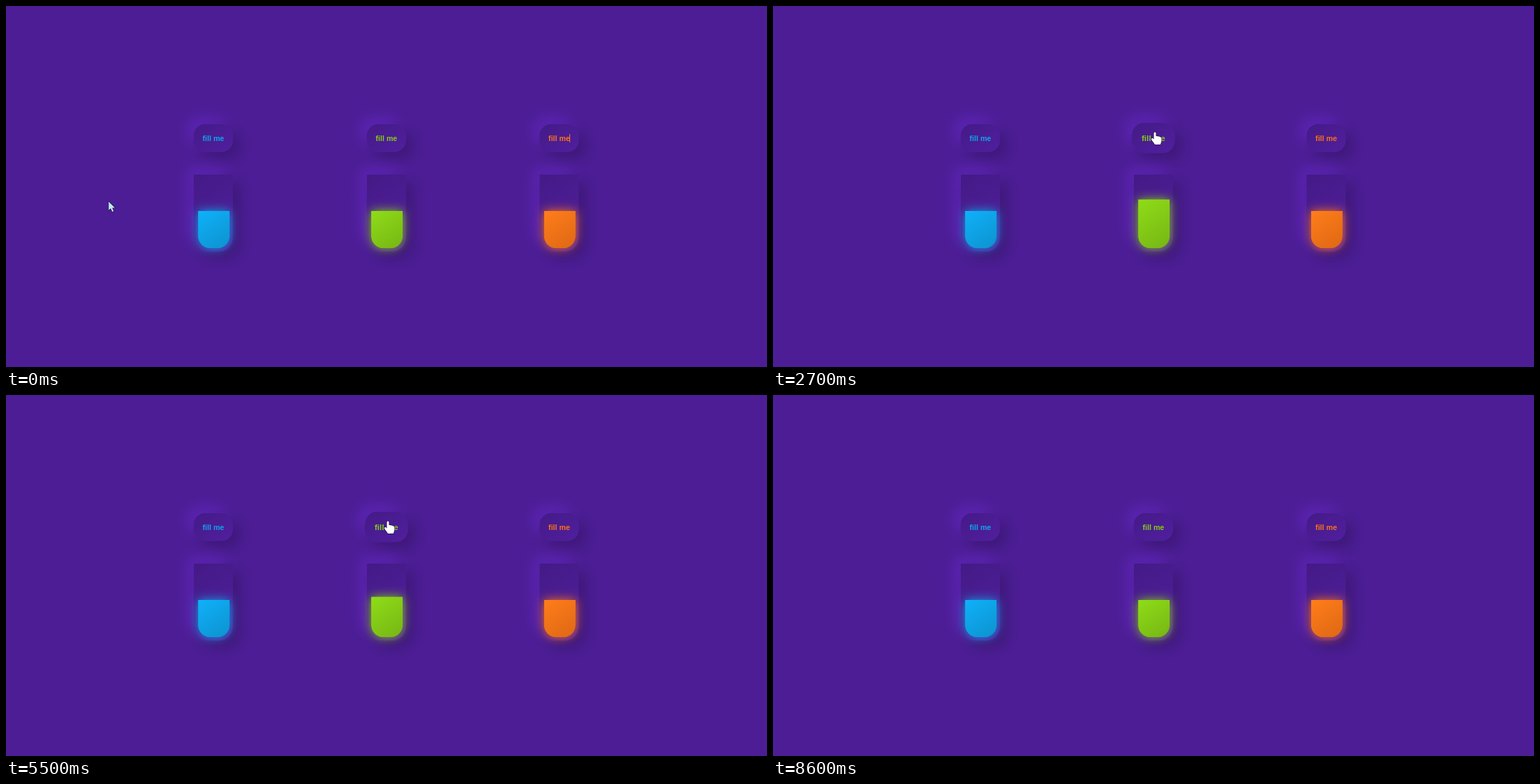
An HTML page with a canvas for the animation above (8.7 s loop, 1086 by 516 pixels).

```html
<!DOCTYPE html>
<html lang="en">
<head>
<meta charset="utf-8">
<title>Fill buttons</title>
<style>
  html, body { margin: 0; width: 100%; height: 100%; overflow: hidden; background: #4c1d95; }
  canvas { display: block; }
</style>
</head>
<body>
<canvas id="stage" width="1086" height="516"></canvas>
<script>
const ctx = document.getElementById('stage').getContext('2d');
const LOOP = 8700, STEP = 100;
const DARK = '#3d1777', LIGHT = '#5b23b3';
const BTN = { y: 169, w: 55.4, h: 39.4, r: 16 };
const TUBE = { y: 241, h: 110, r: [0, 0, 20, 20] };
const FILL = { bottom: 346, low: 53, high: 80, w: 44.5 };
const RISE = 1000, HOLD = 150, FALL = 500;

const columns = [
  { x: 268.2, text: '#0ea5e9', top: '#0fb1f9', end: '#0d92ce', clicks: [880, 6950] },
  { x: 515.2, text: '#84cc16', top: '#8fdc18', end: '#76b614', clicks: [2130, 5250] },
  { x: 761.8, text: '#f97316', top: '#ff7d1a', end: '#de6814', clicks: [3850] }
];

// Pointer stops: time, x, y
const path = [
  [0, 146, 279], [200, 146, 279], [750, 299, 180], [1100, 299, 180],
  [1700, 461, 85], [1950, 474, 88], [2110, 545, 180], [2800, 545, 180],
  [3200, 655, 152], [3650, 796, 180], [4050, 796, 180], [4700, 661.5, 329],
  [5150, 545, 180], [5550, 545, 180], [6300, 349.5, 233], [6400, 345, 231],
  [6800, 299, 180], [7030, 299, 180], [7300, 522, 371], [7400, 613, 451],
  [7550, 700, 500], [7700, 727, 520], [8700, 727, 520]
];

const clamp = v => Math.max(0, Math.min(1, v));
const easeInOut = v => { v = clamp(v); return v * v * (3 - 2 * v); };

function slope(i, axis) {
  return (path[i + 1][axis] - path[i][axis]) / (path[i + 1][0] - path[i][0]);
}

// Monotone tangent: still at stops and turning points
function tangent(i, axis) {
  if (i === 0 || i === path.length - 1) return 0;
  const a = slope(i - 1, axis), b = slope(i, axis);
  return a * b <= 0 ? 0 : 2 * a * b / (a + b);
}

function pointerAt(t) {
  let i = 0;
  while (i < path.length - 2 && t >= path[i + 1][0]) i++;
  const span = path[i + 1][0] - path[i][0];
  const u = clamp((t - path[i][0]) / span), u2 = u * u, u3 = u2 * u;
  return [1, 2].map(axis =>
    path[i][axis] * (2 * u3 - 3 * u2 + 1) +
    path[i + 1][axis] * (3 * u2 - 2 * u3) +
    span * tangent(i, axis) * (u3 - 2 * u2 + u) +
    span * tangent(i + 1, axis) * (u3 - u2));
}

function isOver(col, t) {
  const [x, y] = pointerAt(t);
  return x >= col.x && x <= col.x + BTN.w && y >= BTN.y && y <= BTN.y + BTN.h;
}

function hoverAmount(col, t) {
  let n = 0;
  for (let k = 0; k < 8; k++) n += isOver(col, Math.max(0, t - k * 20));
  return easeInOut(n / 8);
}

function fillHeight(col, t) {
  let level = 0;
  for (const start of col.clicks) {
    const dt = t - start;
    level += easeInOut(dt / RISE) - easeInOut((dt - RISE - HOLD) / FALL);
  }
  return FILL.low + (FILL.high - FILL.low) * level;
}

function gradient(x, y, w, h, from, to) {
  const a = 145 * Math.PI / 180, sx = Math.sin(a), sy = -Math.cos(a);
  const half = (Math.abs(w * sx) + Math.abs(h * sy)) / 2;
  const cx = x + w / 2, cy = y + h / 2;
  const g = ctx.createLinearGradient(cx - sx * half, cy - sy * half, cx + sx * half, cy + sy * half);
  g.addColorStop(0, from);
  g.addColorStop(1, to);
  return g;
}

function box(x, y, w, h, r, fill, shadows) {
  ctx.beginPath();
  ctx.roundRect(x, y, w, h, r);
  ctx.fillStyle = fill;
  for (const [offset, blur, color] of shadows) {
    ctx.shadowOffsetX = ctx.shadowOffsetY = offset;
    ctx.shadowBlur = blur;
    ctx.shadowColor = color;
    ctx.fill();
  }
  ctx.shadowColor = 'transparent';
  ctx.fill();
}

function raised(x, y, w, h, r) {
  box(x, y, w, h, r, gradient(x, y, w, h, '#441a86', '#511f9f'),
    [[-10, 20, LIGHT], [10, 20, DARK]]);
}

function drawColumn(col, t) {
  const cx = col.x + BTN.w / 2, cy = BTN.y + BTN.h / 2;
  const scale = 1 + 0.1 * hoverAmount(col, t);
  ctx.save();
  ctx.translate(cx, cy);
  ctx.scale(scale, scale);
  ctx.translate(-cx, -cy);
  raised(col.x, BTN.y, BTN.w, BTN.h, BTN.r);
  ctx.font = 'bold 10.67px "Liberation Sans", Arial, sans-serif';
  ctx.textAlign = 'center';
  ctx.fillStyle = col.text;
  ctx.fillText('fill me', cx, 192.6);
  ctx.restore();

  raised(col.x, TUBE.y, BTN.w, TUBE.h, TUBE.r);
  const h = fillHeight(col, t), x = col.x + 6.2, y = FILL.bottom - h;
  box(x, y, FILL.w, h, [0, 0, 17, 17], gradient(x, y, FILL.w, h, col.top, col.end),
    [[0, 15, col.text]]);
}

const arrow = new Path2D('M.5 .5V13L3.4 10.3L5.6 15.2L7.7 14.3L5.6 9.5H9.4Z');
const hand = new Path2D('M-1.5 1.5Q0 -.8 1.5 1.5V6.2Q3 5 4.3 6.6Q6 5.7 7 7.3' +
  'Q9.4 6.8 9.4 9V13Q9 15.2 7.8 18H0Q-1.5 15.4 -4 12.4Q-6 9.6 -4.2 8.9Q-3 8.6 -1.5 10.6Z');

function drawPointer(t) {
  const [x, y] = pointerAt(t);
  const over = columns.some(col => isOver(col, t));
  const pressed = columns.some(col => col.clicks.some(c => t >= c - 130 && t < c + 100));
  ctx.save();
  ctx.translate(x, y);
  if (pressed) {
    ctx.beginPath();
    ctx.arc(0, 0, 9.7, 0, Math.PI * 2);
    ctx.fillStyle = 'rgba(226, 205, 38, .58)';
    ctx.fill();
  }
  const shape = over ? hand : arrow;
  ctx.lineWidth = 1.2;
  ctx.lineJoin = 'round';
  ctx.strokeStyle = '#160b30';
  ctx.stroke(shape);
  ctx.fillStyle = t < 200 ? '#bfe6f5' : '#fff';
  ctx.fill(shape);
  ctx.restore();
}

function draw(t) {
  ctx.fillStyle = '#4c1d95';
  ctx.fillRect(0, 0, 1086, 516);
  columns.forEach(col => drawColumn(col, t));
  if (t < 500) {
    ctx.fillStyle = columns[2].text;
    ctx.fillRect(804, 183, 1, 12);
  }
  drawPointer(t);
}

const begin = performance.now();
function tick() {
  const t = (performance.now() - begin) % LOOP;
  draw(Math.floor(t / STEP) * STEP);
  requestAnimationFrame(tick);
}
tick();
</script>
</body>
</html>
```
